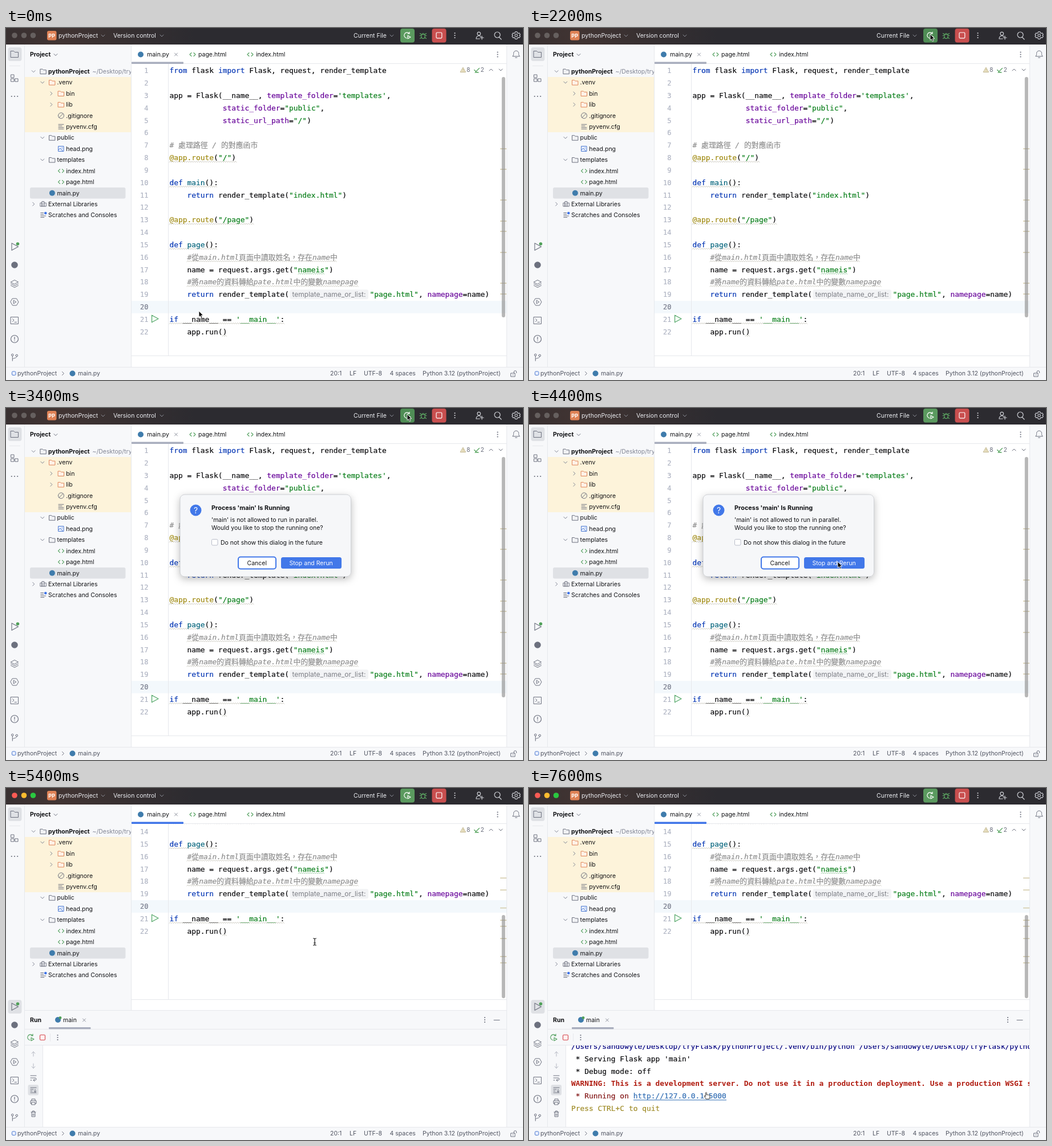
Write an HTML page that moves like this. It is 906 by 618 pixels and loops after 8000 ms.

```html
<!DOCTYPE html>
<html lang="zh-Hant">
<head>
<meta charset="utf-8">
<title>Flask editor</title>
<style>
html, body { margin: 0; width: 100%; height: 100%; overflow: hidden; background: #f7f8fa; }
svg { display: block; width: 100vw; height: 100vh; }
text { white-space: pre; font: 10.5px Inter, "Open Sans", sans-serif; color: #111215; fill: currentColor; }
text.b { font-weight: 700; }
text.c { font: 12.9px "DejaVu Sans Mono", "Noto Sans CJK TC", "Noto Sans CJK JP", monospace; color: #0a0a0c; stroke: currentColor; stroke-width: .18; }
text.n { font-size: 12px; color: #aeb3c2; text-anchor: end; }
text.w { font-weight: 700; stroke: none; }
.k { color: #0033b3; } .s { color: #067d17; } .f { color: #00627a; }
.p { color: #660099; } .d { color: #9e880d; } .i { color: #8c8c8c; font-style: italic; }
.u { font-style: normal; }
tspan { fill: currentColor; }
.l { fill: none; stroke: #6c707e; stroke-linecap: round; stroke-linejoin: round; }
</style>
</head>
<body>
<svg id="stage" viewBox="0 0 906 618" xmlns="http://www.w3.org/2000/svg"></svg>
<script>
const LOOP = 8000, STEP = 200, ROW = 21.83, BASE = 79.3, SCROLL = 282;
const TOOLTIP = 2800, DIALOG = 3200, RERUN = 4600, PANEL = 5400, OUTPUT = 5600, FADE = 6800;

const esc = s => s.replace(/&/g, '&amp;').replace(/</g, '&lt;');
const text = (x, y, s, cls = '', color = '') =>
  `<text x="${x}" y="${y}" class="${cls}"${color && ` style="color:${color}"`}>${esc(s)}</text>`;
const label = (x, mid, s, cls, color) => text(x, mid + 3.8, s, cls, color);
const rect = (x, y, w, h, fill, r = 0, more = '') =>
  `<rect x="${x}" y="${y}" width="${w}" height="${h}" rx="${r}" fill="${fill}" ${more}/>`;
const disc = (x, y, r, fill, more = '') => `<circle cx="${x}" cy="${y}" r="${r}" fill="${fill}" ${more}/>`;
const icon = (x, y, d, color = '#6c707e', w = 1, fill = 'none') =>
  `<path class="l" transform="translate(${x} ${y})" d="${d}" style="stroke:${color};stroke-width:${w};fill:${fill}"/>`;
const hline = (x, y, w) => rect(x, y, w, 1, '#e6e8ec');
const vline = (x, y, h) => rect(x, y, 1, h, '#e6e8ec');
const group = (id, body, more = '') => `<g id="${id}" ${more}>${body}</g>`;
const dots = (x, y, color = '#6c707e', flat = false) =>
  [-4, 0, 4].map(o => disc(x + (flat ? o * 1.3 : 0), y + (flat ? 0 : o), 1.1, color)).join('');

const DOWN = 'M-3-1.5L0 1.5L3-1.5', RIGHT = 'M-1.5-3L1.5 0L-1.5 3', UP = 'M-3 1.5L0-1.5L3 1.5';
const CROSS = 'M-2.5-2.5l5 5m0-5l-5 5', FOLDER = 'M-5-4h3.8l1.5 1.5h4.7v7h-10z';
const TAGS = 'M-2-3L-5 0L-2 3M2-3L5 0L2 3';
const PLAY = 'M-5-6.3L6.5 0L-5 6.3Z';
const RERUN_ICON = 'M3.6-3.4A5 5 0 1 0 -1 4.8M4-6v3H1M1 .2L6 3L1 5.8Z';
const python = (x, y, r = 5) => disc(x, y, r, '#3f7cac');
const tags = (x, y) => icon(x, y, TAGS, '#4f9e5b', 1.1);

function titleBar() {
  const pale = '#ced0d6', bar = '#eceef2';
  return rect(0, 0, 906, 29, '#2c2b30') + rect(0, 0, 330, 29, 'url(#glow)') +
    [15, 31.5, 47.5].map(x => disc(x, 13, 4.8, '#66605f', 'class="light"')).join('') +
    rect(72, 5, 16.5, 16.5, '#df8256', 3) +
    `<text x="80.2" y="16.7" class="b" style="color:#fff;font-size:9px;text-anchor:middle">PP</text>` +
    label(92, 13, 'pythonProject', '', bar) + icon(170, 13.5, DOWN, '#8a8d96') +
    label(188, 13, 'Version control', '', bar) + icon(273, 13.5, DOWN, '#8a8d96') +
    label(609, 13, 'Current File', '', bar) + icon(676, 13.5, DOWN, '#8a8d96') +
    rect(691, 1, 25, 24.5, '#5b9a5f', 4, 'id="runButton"') + icon(703, 13, RERUN_ICON, '#fff', 1.2) +
    icon(731, 13.5, 'M-3-2h6v4a3 3 0 0 1-6 0zM-2-2a2 2 0 0 1 4 0M-3 0h-3M3 0h3M-3 3l-2.5 2M3 3l2.5 2M-3-2l-2.5-2M3-2l2.5-2', '#5fad65', 1.1) +
    rect(746.5, 1, 25, 24.5, '#c94f4f', 4) + rect(754, 8, 9.8, 9.8, 'none', 1.5, 'stroke="#fff" stroke-width="1.2"') +
    dots(786.5, 13, pale) +
    icon(829, 13, 'M-3-3a2.8 2.8 0 1 0 5.6 0a2.8 2.8 0 1 0-5.6 0M-5 6c0-6 6-6 8-4M-5 6h6M5 1v6M2 4h6', pale, 1.2) +
    icon(861, 13, 'M-5-1a5 5 0 1 0 10 0a5 5 0 1 0-10 0M3 3l4 4', pale, 1.2) +
    icon(894, 13, 'M-1.5-6.5h3l.6 2 1.6.9 2-.5 1.5 2.6-1.5 1.5 1.5 1.5-1.5 2.6-2-.5-1.6.9-.6 2h-3l-.6-2-1.6-.9-2 .5-1.5-2.6 1.5-1.5-1.5-1.5 1.5-2.6 2 .5 1.6-.9zM-2.2 0a2.2 2.2 0 1 0 4.4 0a2.2 2.2 0 1 0-4.4 0', pale, 1.1);
}

function toolStripe() {
  return vline(32, 29, 566) + vline(877, 29, 566) +
    rect(3.5, 34, 24, 24, '#dfe1e5', 4) + icon(15, 46, 'M-6.5-5.5h5l2 2h6v9h-13z') +
    hline(6, 66, 19) +
    icon(15, 88, 'M-6-6h5v5h-5zM-6 1h5v5h-5zM1 1h5v5h-5z') + dots(15, 120, '#6c707e', true) +
    rect(3.5, 372, 24, 24, '#dfe1e5', 4, 'id="runMark"') + icon(15, 384, PLAY, '#6c707e', 1.1) +
    disc(20.5, 379, 2.8, '#4fa058', 'id="runDot"') +
    disc(15, 416, 5.8, '#6c707e') +
    icon(15, 449, 'M-6.5-3L0-6.5L6.5-3L0 .5ZM-6.5 0L0 3.5L6.5 0M-6.5 3L0 6.5L6.5 3') +
    icon(15, 481, 'M-3.5-6h7l3.5 6l-3.5 6h-7l-3.5-6zM-1.5-2.8L2.8 0L-1.5 2.8Z') +
    icon(15, 513.5, 'M-6.5-6h13v12h-13zM-3.5-3l2.5 2.5l-2.5 2.5M0 3h3.5') +
    icon(15, 546, 'M-6.5 0a6.5 6.5 0 1 0 13 0a6.5 6.5 0 1 0-13 0M0-3.5v4.2M0 3v.4', '#6c707e', 1.2) +
    icon(15, 578, 'M-5.5-4a1.8 1.8 0 1 0 3.6 0a1.8 1.8 0 1 0-3.6 0M2-3a1.8 1.8 0 1 0 3.6 0a1.8 1.8 0 1 0-3.6 0M-3.7-2.2V6.5M3.8-1.2c0 4-7.5 2-7.5 5') +
    icon(894, 46, 'M-6 3.5c2-2 1.5-4 1.5-5a4.5 4.5 0 0 1 9 0c0 1-.5 3 1.5 5zM-1.5 6h3');
}

function projectTree() {
  // name, indent, icon, chevron
  const rows = [
    ['pythonProject', 0, 'dir', DOWN], ['.venv', 1, 'lib', DOWN], ['bin', 2, 'lib', RIGHT], ['lib', 2, 'lib', RIGHT],
    ['.gitignore', 2, 'ignore'], ['pyvenv.cfg', 2, 'lines'], ['public', 1, 'dir', DOWN], ['head.png', 2, 'image'],
    ['templates', 1, 'dir', DOWN], ['index.html', 2, 'tags'], ['page.html', 2, 'tags'], ['main.py', 1, 'py'],
    ['External Libraries', 0, 'books', RIGHT], ['Scratches and Consoles', 0, 'notes']];
  const art = {
    dir: (x, y) => icon(x, y, FOLDER, '#6c707e', 1, '#f0f1f4'),
    lib: (x, y) => icon(x, y, FOLDER, '#e0875a', 1, '#fff1e6'),
    ignore: (x, y) => icon(x, y, 'M-5 0a5 5 0 1 0 10 0a5 5 0 1 0-10 0M-3.5 3.5l7-7'),
    lines: (x, y) => icon(x, y, 'M-4.5-4h9M-4.5-1.3h6M-4.5 1.4h9M-4.5 4h9'),
    image: (x, y) => icon(x, y, 'M-4.5-4.5h9v9h-9zM-4.5 2l3-3l5 5.5M1.5-1.5h.6', '#4a78d0', 1, '#e9f0ff'),
    tags, py: python,
    books: (x, y) => icon(x, y, 'M-5-2h3v6h-3zM-2-4.5h3.5v8.5h-3.5zM1.5-2h3.5v6h-3.5z'),
    notes: (x, y) => icon(x, y, 'M-4.5-4h5M-4.5-1.3h5M-4.5 1.4h9M-4.5 4h6') + disc(x + 4, y - 3.5, 2.3, '#3f74e8')
  };
  let out = rect(33, 86, 186, 97, '#fdf3da') + rect(42, 280, 167.5, 19.5, '#dfe1e5', 3) +
    label(42, 46.5, 'Project', 'b') + icon(87, 47, DOWN);
  rows.forEach(([name, depth, kind, chevron], i) => {
    const y = 76.2 + i * 19.41, x = 74 + depth * 15.6;
    out += art[kind](x - 8.7, y) + label(x, y, name, i ? '' : 'b');
    if (chevron) out += icon(x - 25.8, y, chevron, '#818594');
  });
  return `<g clip-path="url(#tree)">${out}${label(151.5, 76.2, '~/Desktop/try', '', '#818594')}</g>` + vline(219, 29, 566);
}

const SOURCE = [
  '{k from} flask {k import} Flask, request, render_template', '',
  "app = Flask(__name__, {p template_folder}={s 'templates'},",
  '            {p static_folder}={s "public"},',
  '            {p static_url_path}={s "/"})', '',
  '{i # 處理路徑 / 的對應函市}',
  '{d @app.route}({s "/"})', '',
  '{k def} {f main}():',
  '    {k return} render_template({s "index.html"})', '',
  '{d @app.route}({s "/page"})', '',
  '{k def} {f page}():',
  '    {i #從main.html頁面中讀取姓名，存在name中}',
  '    name = request.args.get({s "nameis"})',
  '    {i #將name的資料轉給pate.html中的變數namepage}',
  '    {k return} render_template(', '',
  "{k if} __name__ == {s '__main__'}:",
  '    app.run()'];
const upright = s => s.replace(/[\u3000-\uffef]+/g, '<tspan class="u">$&</tspan>');
const code = (x, y, s, cls = '', color = '') => `<text x="${x}" y="${y}" class="c ${cls}"${color && ` style="color:${color}"`}>` +
  s.replace(/\{(\w) ([^}]*)\}/g, (m, c, t) => `<tspan class="${c}">${upright(t)}</tspan>`) + '</text>';
const wave = (line, x1, x2, color = '#bcb9ad') => icon(x1, BASE + (line - 1) * ROW + 3.6,
  'M0 0' + 'l1.9-1.8l1.9 1.8'.repeat(Math.round((x2 - x1) / 3.8)), color, 0.8);

function editor() {
  let body = rect(220, BASE + 19 * ROW - 15.1, 657, 21.8, '#f3f8fc') + vline(284, 0, 1000);
  const waves = [[8, 286, 402], [10, 286, 371], [13, 286, 433], [15, 286, 371], [16, 317, 581],
    [18, 317, 617], [21, 286, 488], [22, 379, 387]];
  body += waves.map(w => wave(...w)).join('') + wave(17, 512, 558, '#79b984');
  SOURCE.forEach((s, i) => {
    const y = BASE + i * ROW;
    body += text(249.5, y, String(i + 1), 'c n', i === 19 ? '#767a8a' : '') + code(286.5, y, s);
  });
  const y19 = BASE + 18 * ROW;
  body += rect(497.5, y19 - 13, 137.5, 17, '#f2f3f5', 3) +
    `<text x="501.5" y="${y19 - .6}" style="font-size:12px;color:#7d7f86">template_name_or_list:</text>` +
    code(637.5, y19, '{s "page.html"}, {p namepage}=name)') +
    icon(260.5, 510.5, PLAY, '#55a76a', 1.2, '#f2fcf3') + rect(286, 481, 2, 17, '#000', 0, 'id="caret"');
  return rect(220, 29, 657, 566, '#fff') + `<g clip-path="url(#code)">${group('lines', body)}</g>` +
    rect(220, 575, 657, 400, '#fff', 0, 'id="foot"') + rect(220, 575, 657, 1, '#e6e8ec', 0, 'id="footLine"') +
    [212, 248, 302, 339, 357, 394, 448, 467].map(y =>
      rect(866, y - .7, 11, 1.5, '#d3c9a6', 0, `class="mark" data-y="${y}"`)).join('') +
    rect(868.8, 86, 6, 422, '#8c8c8c', 3, 'id="thumb" opacity=".62"') +
    icon(801, 73.5, 'M0-4L4.5 4h-9zM0-1v2M0 2.7v.1', '#bfb48c', 1, '#eee6c8') + label(807, 73.5, '8', '', '#6c707e') +
    icon(825, 73.5, 'M-4.5 0l3 3l6-6M-3 5q1-2 2 0q1-2 2 0q1-2 2 0', '#4fa058', 1.1) + label(831.5, 73.5, '2', '', '#6c707e') +
    icon(850, 73.5, UP) + icon(867, 73.5, DOWN);
}

function tabs() {
  return rect(220, 29, 657, 34, '#fff') + hline(220, 62, 657) +
    rect(220, 59.5, 91, 3.5, '#a8adbd', 1, 'id="tabLine"') +
    python(236, 46.5) + label(247, 46.5, 'main.py') + icon(298, 46.5, CROSS, '#8c909c') +
    tags(327, 46.5) + label(337, 46.5, 'page.html') + tags(428, 46.5) + label(438, 46.5, 'index.html') + dots(861.5, 46.5);
}

function runPanel() {
  const line = n => 479.8 + n * ROW;
  const home = '/Users/sandowyle/Desktop/tryFlask/pythonProject/';
  const output = code(74, line(-1), home + '.venv/bin/python ' + home + 'main.py', '', '#00007f') +
    code(74, line(0), " * Serving Flask app 'main'") + code(74, line(1), ' * Debug mode: off') +
    text(74, line(2), 'WARNING: This is a development server. Do not use it in a production deployment. Use a production WSGI server instead.', 'c w', '#b01c10') +
    text(74, line(3), ' * Running on ', 'c', '#7f0f0f') + text(182.8, line(3), 'http://127.0.0.1:5000', 'c', '#2f6cb3') +
    rect(183, line(3) + 2, 163, 1, '#2f6cb3') + text(74, line(4), 'Press CTRL+C to quit', 'c', '#9e8a24');
  const tools = ['M0 4V-4M-3-1L0-4L3-1', 'M0-4V4M-3 1L0 4L3 1', 'M-5-4h10M-5 0h8a2 2 0 0 1 0 4h-3M2 2l-2 2l2 2M-5 4h2',
    'M-5-4h10M-5-1h5M-5 2h3M3-1v5M1 2l2 2l2-2M-5 5h10', 'M-3-2v-3h6v3M-3 3h-2v-5h10v5h-2M-3 1h6v4h-6z', 'M-4-3h8M-3-3v8h6v-8M-1.5-3v-2h3v2M-1 0v3M1 0v3'];
  return rect(33, 390, 844, 205, '#f7f8fa') + hline(33, 390, 844) +
    label(42, 407, 'Run', 'b') + python(91, 407) + disc(95, 403.5, 2.4, '#4fa058') + label(100, 407, 'main') +
    icon(137, 407.5, CROSS, '#8c909c') + hline(33, 423, 844) + rect(75, 420, 73.5, 3.3, '#a8adbd', 1) +
    dots(839, 407) + icon(860, 407.5, 'M-5 0h10') +
    icon(43, 438, RERUN_ICON, '#4f9e5b', 1.1) + rect(59.5, 433.5, 9, 9, '#fff1f0', 1.5, 'stroke="#d5484f" stroke-width="1.1"') +
    vline(77, 431, 14) + dots(90.5, 438) + hline(33, 451, 844) + rect(64, 452, 813, 143, '#fff') + vline(64, 452, 143) +
    rect(38.5, 521, 18.5, 18.5, '#dfe1e5', 3) +
    tools.map((d, i) => icon(48, 467 + i * 21, d, i < 2 ? '#b5b8c2' : '#6c707e')).join('') +
    group('output', output, 'clip-path="url(#console)"') +
    group('bars', rect(76, 587, 673, 5.8, '#878787', 2.9) + rect(869.3, 463, 5.8, 130, '#878787', 2.9));
}

function statusBar() {
  return rect(0, 595, 906, 23, '#f7f8fa') + hline(0, 595, 906) +
    rect(10.5, 603, 6.5, 6.5, '#eaf0ff', 1.5, 'stroke="#4a78d0"') +
    label(20, 606.5, 'pythonProject', '', '#4f5360') + icon(100, 606.5, RIGHT) + python(116.5, 606.5) +
    [[126, 'main.py'], [568, '20:1'], [602, 'LF'], [627, 'UTF-8'], [672.5, '4 spaces'], [730, 'Python 3.12 (pythonProject)']]
      .map(([x, s]) => label(x, 606.5, s, '', '#4f5360')).join('') +
    icon(890, 607, 'M-5-1h7v6h-7zM0-1v-2a2.3 2.3 0 0 1 4.6 0v1.5M-1.5 1.5v1');
}

const tooltip = () => rect(716.5, 40, 106, 28, '#27282e', 4, 'filter="url(#shadow)"') +
  label(726, 54, "Run 'main.py'", '', '#fff') + icon(801.5, 52, UP, '#a8adbd') + label(806, 54, 'R', '', '#a8adbd');

function dialog() {
  return rect(305, 152, 299.5, 144, '#f6f7f9', 8, 'filter="url(#shadow)"') +
    rect(305, 152, 299.5, 144, '#f6f7f9', 8, 'stroke="#c6c8cd" stroke-width=".8"') +
    disc(332.5, 179.5, 10, '#4278e9') +
    `<text x="332.5" y="184.6" style="font-size:14px;color:#fff;text-anchor:middle">?</text>` +
    `<text x="360" y="179.4" class="b" style="font-size:10.9px">Process 'main' Is Running</text>` +
    label(360, 196, "'main' is not allowed to run in parallel.") +
    label(360, 210, 'Would you like to stop the running one?') +
    rect(360.5, 230.5, 10.5, 10.5, '#fff', 2, 'stroke="#b9bdc9"') + label(376, 236, 'Do not show this dialog in the future') +
    rect(407, 261.5, 66, 21, '#fff', 4, 'stroke="#4278e9" stroke-width="2"') + label(422.5, 272, 'Cancel') +
    rect(482, 262, 106, 20, '#4278e9', 3.5) + label(496.5, 272, 'Stop and Rerun', '', '#fff');
}

const pointers = () => group('arrow', icon(0, 0, 'M0 0V10.5L2.4 8.4L4.2 12.4L6 11.6L4.3 7.7H7.4Z', '#fff', .9, '#000')) +
  group('beam', icon(0, 0, 'M-2.5-6Q0-6 0-4.5Q0-6 2.5-6M0-4.5V4.5M-2.5 6Q0 6 0 4.5Q0 6 2.5 6M-1.5 2h3', '#222', 1.2)) +
  group('hand', icon(0, 0, 'M-2.6 0V-5q1-1.6 2 0V-1q1-1.2 2 0q1-.9 1.8.2q1.2-.6 1.8.6V3q-.4 2-1.2 3H-1.8Q-3 4-5 1q0-1.8 2.4.4Z', '#222', .9, '#fff'));

const box = (id, x, y, w, h) => `<clipPath id="${id}">${rect(x, y, w, h, '#000')}</clipPath>`;
const stage = document.getElementById('stage');
stage.innerHTML = '<defs>' + box('tree', 33, 29, 186, 566) + box('code', 220, 63, 657, 532) + box('console', 65, 452, 812, 143) +
  '<linearGradient id="glow"><stop offset="0" stop-color="#383031"/><stop offset=".28" stop-color="#413432"/><stop offset="1" stop-color="#2c2b30"/></linearGradient>' +
  '<filter id="shadow" x="-30%" y="-60%" width="160%" height="250%"><feDropShadow dx="0" dy="4" stdDeviation="7" flood-opacity=".28"/></filter></defs>' +
  rect(0, 0, 906, 618, '#f7f8fa') + toolStripe() + projectTree() + editor() + tabs() + group('panel', runPanel()) +
  statusBar() + titleBar() + group('tooltip', tooltip()) + group('dialog', dialog()) + pointers();

const el = id => document.getElementById(id);
const set = (id, name, value) => el(id).setAttribute(name, value);
const show = (id, on) => set(id, 'visibility', on ? 'inherit' : 'hidden');
const lights = [...document.querySelectorAll('.light')], marks = [...document.querySelectorAll('.mark')];

// start, end, then a quadratic curve: from, control, to
const MOVES = [
  [800, 2000, 338, 497, 423.5, 182, 703, 11],
  [3400, 4200, 703, 11, 610, 130, 541, 270],
  [6600, 7600, 541, 274, 430, 430, 312, 540]];
function pointerAt(t) {
  const [a, b, x0, y0, x1, y1, x2, y2] = MOVES.findLast(m => t >= m[0]) || MOVES[0];
  const p = Math.min(1, Math.max(0, (t - a) / (b - a))), e = p * p * (3 - 2 * p), q = 1 - e;
  return [q * q * x0 + 2 * q * e * x1 + e * e * x2, q * q * y0 + 2 * q * e * y1 + e * e * y2];
}

function draw(t) {
  const focused = t >= RERUN, open = t >= PANEL;
  const [x, y] = pointerAt(t);
  const kind = !focused ? 'arrow' : y > 532 ? 'hand' : 'beam';
  for (const id of ['arrow', 'beam', 'hand']) {
    show(id, id === kind);
    set(id, 'transform', `translate(${x} ${y})`);
  }
  show('tooltip', t >= TOOLTIP && t < DIALOG);
  show('dialog', t >= DIALOG && t < RERUN);
  show('panel', open);
  show('output', t >= OUTPUT);
  set('bars', 'opacity', t < OUTPUT ? 0 : Math.max(0, Math.min(1, 1 - (t - FADE) / 400)));
  show('runMark', open);
  show('runDot', !focused || open);
  show('caret', focused && (t - RERUN + 900) % 1000 < 500);
  set('runButton', 'fill', x > 691 && x < 716 && y < 26 ? '#4f8d55' : '#5b9a5f');
  set('tabLine', 'fill', focused ? '#3f74e8' : '#a8adbd');
  lights.forEach((c, i) => c.setAttribute('fill', focused ? ['#fc5b54', '#fdbc2f', '#2ac840'][i] : '#66605f'));
  set('lines', 'transform', `translate(0 ${open ? -SCROLL : 0})`);
  set('foot', 'y', open ? 371 : 575);
  set('footLine', 'y', open ? 371 : 575);
  set('thumb', 'y', open ? 223 : 86);
  set('thumb', 'height', open ? 146 : 422);
  marks.forEach(m => m.setAttribute('y', (open ? 158 + (m.dataset.y - 212) * 0.584 : +m.dataset.y) - .7));
}

const start = performance.now();
function tick() {
  const t = (performance.now() - start) % LOOP;
  draw(Math.floor(t / STEP) * STEP);
  requestAnimationFrame(tick);
}
tick();
</script>
</body>
</html>
```
